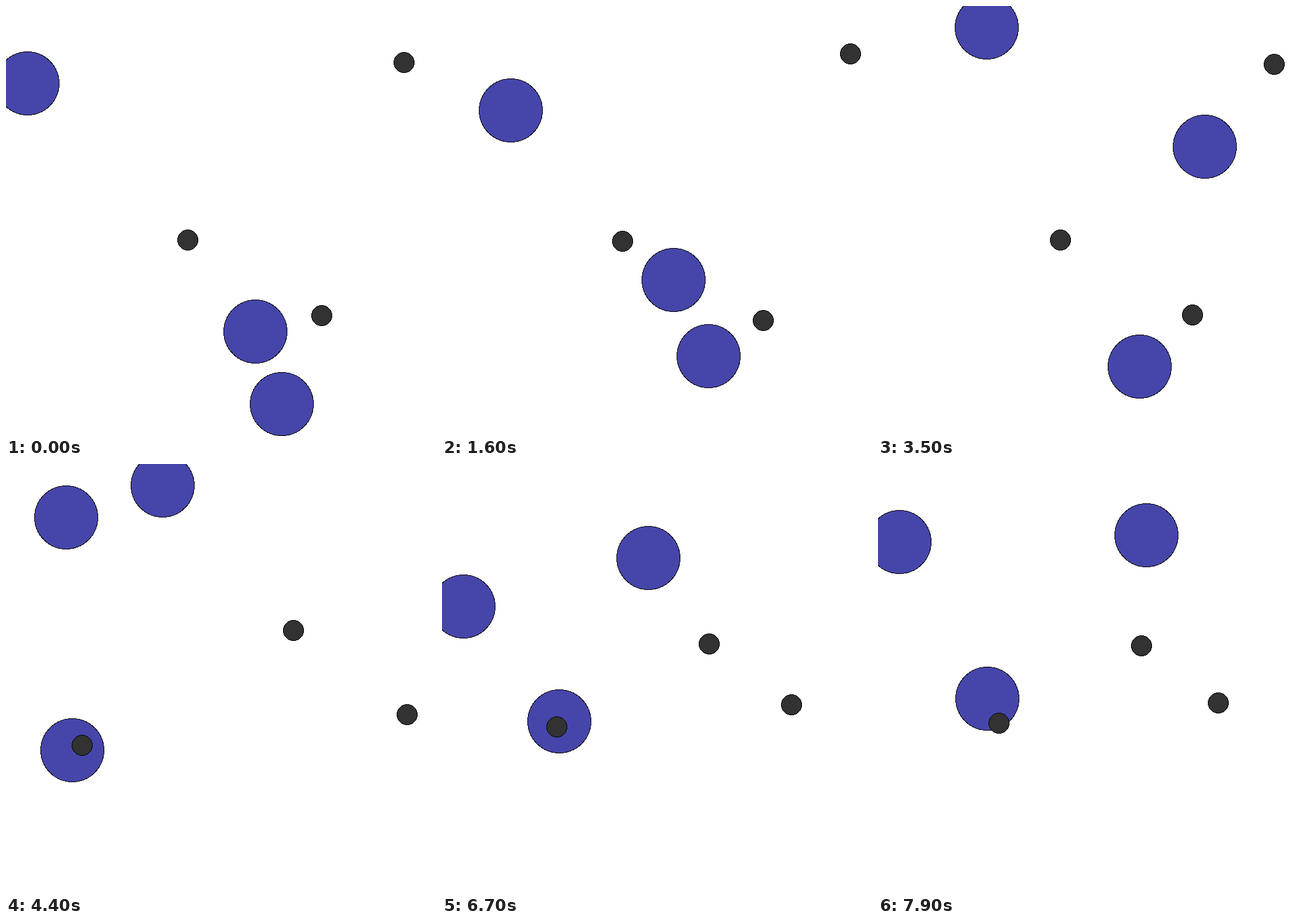
Write an HTML page that moves like this. It is 700x700 px and loops after 8000 ms.

```html
<!DOCTYPE html>
<html lang="en">
<head>
<meta charset="utf-8">
<title>Agents and landmarks</title>
<style>
  html, body { margin: 0; width: 100%; height: 100%; overflow: hidden; background: #fff; }
  svg { display: block; width: 700px; height: 700px; }
  circle { stroke: #000; stroke-width: 1; shape-rendering: crispEdges; }
  .agent { fill: #4646aa; }
  .mark { fill: #323232; }
</style>
</head>
<body>
<svg id="stage" viewBox="0 0 700 700"></svg>
<script>
const STEP = 100, STEPS = 80, MID = 350, REACH = 315;

// World points [x, y] around the stage centre; agents pass their waypoints at the given steps.
const episodes = [
  {
    times: [0, 9, 16, 27, 35],
    marks: [[315, -271.4], [-56, 33.4], [173.2, 162.9]],
    agents: [
      [[-332.4, -236], [-270, -216], [-237.5, -179.5], [-165, -201], [-183.6, -335.3]],
      [[59.6, 190.5], [43, 150], [27.5, 96.5], [159, -30], [194.3, -128.3]],
      [[105, 315], [86, 297], [84.5, 220.5], [83, 272], [81.4, 252.8]]
    ]
  },
  {
    times: [37, 44, 55, 63, 67, 79],
    marks: [[123, -81.9], [315, 61.2], [-234.2, 112.3]],
    agents: [
      [[-255, -290], [-261, -272.5], [-363.5, -172.5], [-451, -150], [-453, -169], [-485, -342.6]],
      [[-110, -285], [-98, -327], [-30.6, -289], [-10, -275], [-19.4, -282.6], [134.7, -359.5]],
      [[-245, 229], [-250.7, 121], [-261.4, 101], [-250, 109], [-228, 100], [-264, 50]]
    ]
  }
];

// Smooth cubic curve through unevenly spaced values.
function curve(times, values, t) {
  const last = times.length - 1;
  let i = 0;
  while (i < last - 1 && t >= times[i + 1]) i++;
  const rate = k => (values[k + 1] - values[k]) / (times[k + 1] - times[k]);
  const slope = k => {
    if (k === 0) return rate(0);
    if (k === last) return rate(last - 1);
    const before = times[k] - times[k - 1], after = times[k + 1] - times[k];
    return (rate(k - 1) * after + rate(k) * before) / (before + after);
  };
  const span = times[i + 1] - times[i], u = (t - times[i]) / span, v = 1 - u;
  return v * v * (1 + 2 * u) * values[i] + u * u * (3 - 2 * u) * values[i + 1]
    + span * u * v * (v * slope(i) - u * slope(i + 1));
}

const stage = document.getElementById("stage");

function addCircle(kind, radius) {
  const circle = document.createElementNS("http://www.w3.org/2000/svg", "circle");
  circle.setAttribute("class", kind);
  circle.setAttribute("r", radius - 0.5);
  return stage.appendChild(circle);
}

const circles = [
  ...[0, 1, 2].map(() => addCircle("agent", 52)),
  ...[0, 1, 2].map(() => addCircle("mark", 17))
];

// Whole pixels, with a small allowance for rounding errors.
const toPixel = v => Math.floor(MID + v + 1e-6);

function draw(step) {
  const { times, marks, agents } = episodes[step < episodes[1].times[0] ? 0 : 1];
  const place = path => [0, 1].map(axis => curve(times, path.map(p => p[axis]), step));
  const points = [...agents.map(place), ...marks];
  // The camera zooms so that the farthest coordinate stays at a fixed reach.
  const zoom = REACH / Math.max(...points.flat().map(Math.abs));
  points.forEach(([x, y], i) => {
    circles[i].setAttribute("cx", toPixel(x * zoom));
    circles[i].setAttribute("cy", toPixel(y * zoom));
  });
}

const start = performance.now();
let shown = -1;

function tick() {
  const step = Math.floor((performance.now() - start) / STEP) % STEPS;
  if (step !== shown) draw(shown = step);
  requestAnimationFrame(tick);
}
tick();
</script>
</body>
</html>
```
